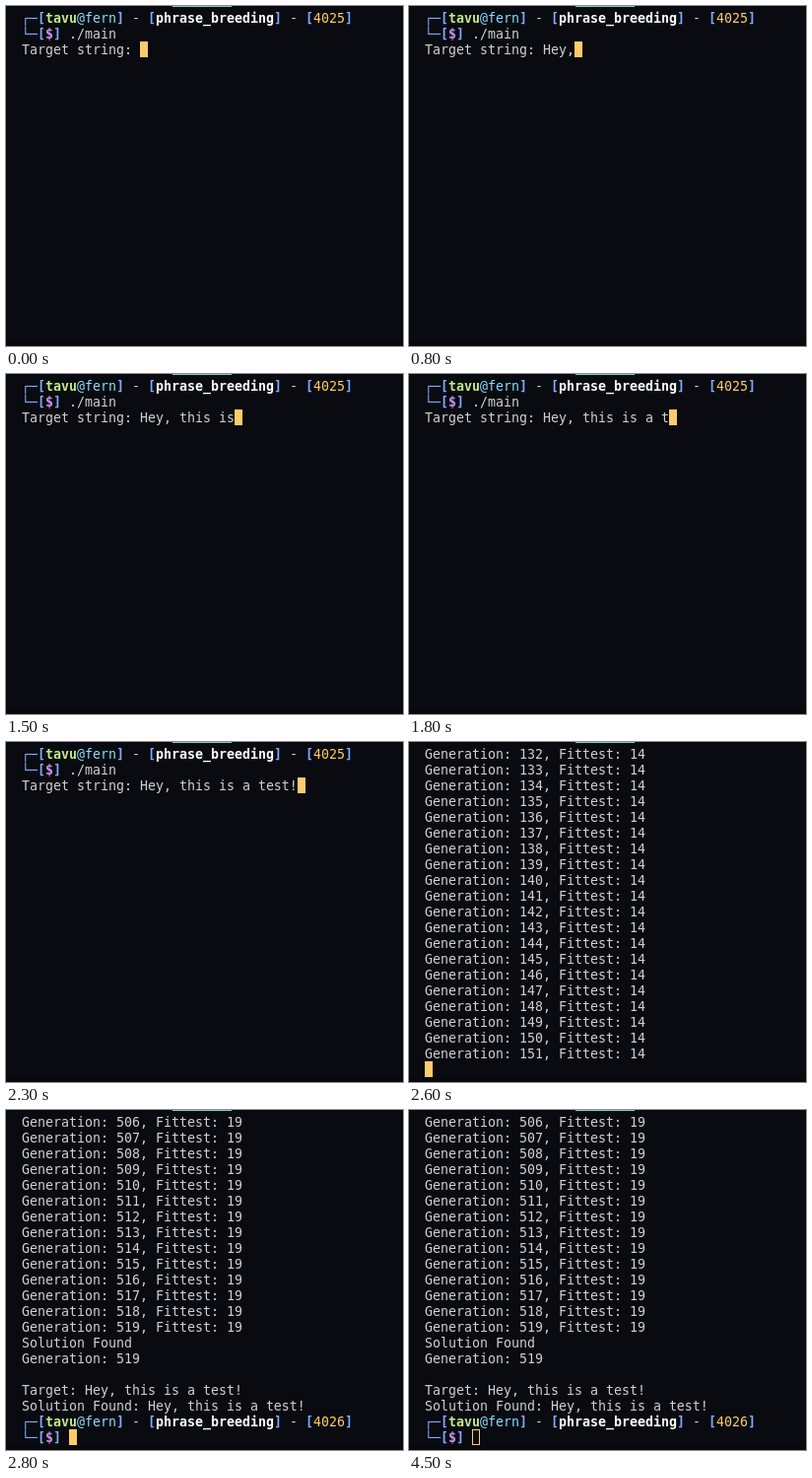
These frames come from a looping animation (403x345 px, 4900 ms). An HTML page:

```html
<!DOCTYPE html>
<html lang="en">
<head>
<meta charset="utf-8">
<title>Terminal</title>
<style>
  html, body { margin: 0; width: 100%; height: 100%; overflow: hidden; background: #090b10; }
  #stage {
    position: relative; width: 403px; height: 345px; overflow: hidden;
    background: linear-gradient(#090b10 341px, #08080c 341px);
    color: #d0d0d0; font-family: "DejaVu Sans Mono", monospace; font-size: 13.29px;
  }
  #tab { position: absolute; left: 169px; top: 0; width: 60px; height: 1px; background: #80cbc4; }
  #screen { position: absolute; left: 16px; top: 4px; }
  .row { box-sizing: border-box; height: 16px; padding-top: 1px; line-height: 15px; white-space: pre; }
  b { color: #82aaff; }
  .line { color: #82aaff; }
  .user { color: #c3e88d; }
  .host { color: #89ddff; }
  .dir { color: #fff; }
  .num { color: #ffcb6b; }
  .sign { color: #c792ea; }
  #caret {
    position: absolute; box-sizing: border-box; width: 8px; height: 16px;
    border: 1px solid #ffcb6b; background: #ffcb6b;
  }
  #caret.hollow { background: none; }
</style>
</head>
<body>
<div id="stage">
  <div id="tab"></div>
  <div id="screen"></div>
  <div id="caret"></div>
</div>
<script>
const LOOP = 4900;
const PHRASE = "Hey, this is a test!";
const screenEl = document.getElementById("screen");
const caret = document.getElementById("caret");

// [time in ms, characters typed]
const TYPING = [
  [0, 0], [400, 1], [600, 2], [700, 3], [800, 4],
  [1000, 5], [1100, 6], [1200, 8], [1300, 9], [1400, 11], [1500, 12],
  [1600, 13], [1700, 15], [1800, 16], [1900, 18], [2000, 19], [2300, 20]
];

const bold = (cls, text) => `<b class="${cls}">${text}</b>`;
const span = (cls, text) => `<span class="${cls}">${text}</span>`;
const box = inner => `<b>[</b>${inner}<b>]</b>`;

const prompt = (id, command) => [
  span("line", "┌─") + box(bold("user", "tavu") + span("host", "@fern")) +
    " - " + box(bold("dir", "phrase_breeding")) + " - " + box(span("num", id)),
  span("line", "└─") + box(bold("sign", "$")) + " " + command
];

const generations = (last, count, fittest) => Array.from({ length: count },
  (_, i) => `Generation: ${last - count + 1 + i}, Fittest: ${fittest}`);

const typed = n => ({
  rows: [...prompt(4025, "./main"), "Target string: " + PHRASE.slice(0, n)],
  col: 15 + n, row: 2
});
const running = (last, fittest) => ({ rows: generations(last, 20, fittest), col: 0, row: 20 });
const finished = hollow => ({
  rows: [
    ...generations(519, 14, 19), "Solution Found", "Generation: 519", "",
    "Target: " + PHRASE, "Solution Found: " + PHRASE, ...prompt(4026, "")
  ],
  col: 6, row: 20, hollow
});

const states = [
  ...TYPING.map(([at, n]) => ({ at, ...typed(n) })),
  { at: 2600, ...running(151, 14) },
  { at: 2700, ...running(338, 18) },
  { at: 2800, ...finished(false) },
  { at: 4500, ...finished(true) }
];

let shown = null;

function show(state) {
  screenEl.innerHTML = state.rows.map(r => `<div class="row">${r}</div>`).join("");
  caret.style.left = 16 + state.col * 8 + "px";
  caret.style.top = 4 + state.row * 16 + "px";
  caret.classList.toggle("hollow", !!state.hollow);
  shown = state;
}

function tick() {
  const t = performance.now() % LOOP;
  const state = states.filter(s => s.at <= t).pop();
  if (state !== shown) show(state);
  requestAnimationFrame(tick);
}
tick();
</script>
</body>
</html>
```
